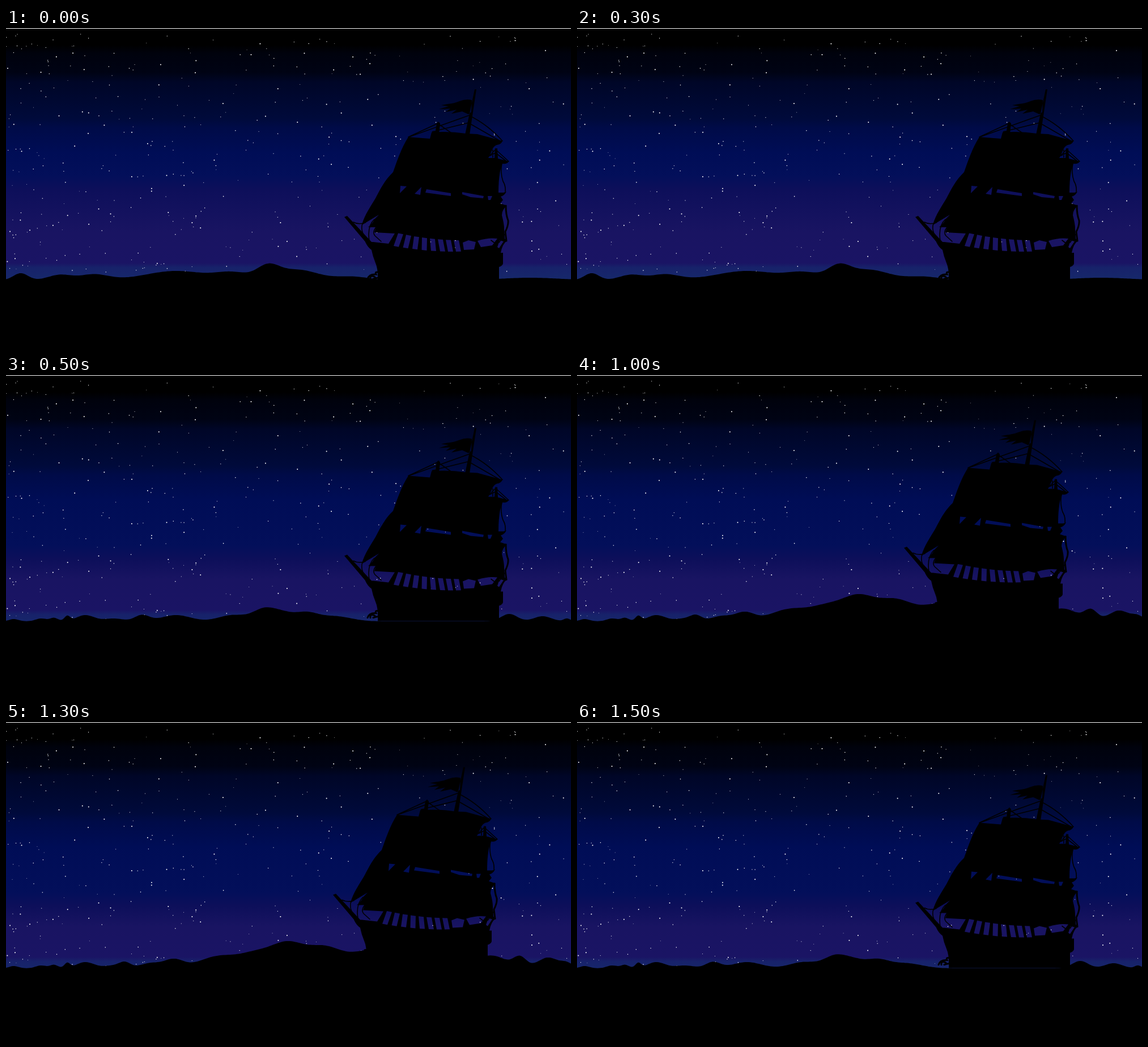
Animation, 997 px wide and 562 px high, one loop 2000 ms. Source, as an HTML page:

```html
<!DOCTYPE html>
<html lang="en">
<head>
<meta charset="utf-8">
<title>Night voyage</title>
<style>
html, body { margin: 0; width: 100%; height: 100%; overflow: hidden; background: #000; }
svg { display: block; width: 100vw; height: 100vh; }
.rope { fill: none; stroke: #000; stroke-width: 1.6; stroke-linecap: round; }
.thick { stroke-width: 3; }
</style>
</head>
<body>
<svg viewBox="0 0 997 562" preserveAspectRatio="none">
  <defs>
    <linearGradient id="sky" gradientUnits="userSpaceOnUse" x1="0" y1="0" x2="0" y2="562"></linearGradient>
  </defs>
  <rect width="997" height="562" fill="url(#sky)"/>
  <path id="stars" fill="#fff"/>
  <g id="ship">
    <!-- sails and hull -->
    <path id="body" fill-rule="evenodd" d="M628 347C632 330 645 312 652 300C660 285 668 268 683 254C690 235 697 212 710 192
      L748 195L751 184Q780 181 812 186L832 187L876 199Q874 205 866 206Q860 208 857 217L851 229H862L863 212H867L868 230
      L887 235Q885 240 876 239Q869 255 869 290H878L883 288Q880 295 873 297L877 303L872 309L884 313
      Q875 320 875 330Q879 345 879 353L880 371L884 375Q876 380 873 396H877V415Q876 419 870 421V448
      H656Q657 425 652 414Q647 402 645 391Q638 386 634 377H648L675 380L686 362L650 360L653 351H639Q646 346 651 336L658 329Z
      M696 278L707 279L695 291Z M721 292L733 280L731 294Z M742 284L785 291V296L740 290Z
      M805 289L843 296L842 300L820 298L805 293Z M850 296H858L855 303H851Z
      M806 378L816 374L829 377L826 390L808 391Z M832 375Q850 369 867 371L858 383L838 386Z M871 374L878 376L870 388L867 386Z"/>
    <!-- bowsprit, masts, flag -->
    <path d="M597 333L602 331L646 378L650 390L640 384L631 373Z
      M827 108H830L818 188H810Z M760 168L763 165L766 168L764 186L749 195L752 182L758 181Z
      M822 127Q812 124 800 129Q791 133 779 134L768 136L781 138L764 143L784 142L776 148L795 144L786 151L805 147L816 152L821 148Z"/>
    <path class="rope" d="M710 192L762 168M711 192L817 154M763 169L786 185M763 180L816 167
      M817 154Q850 170 876 199M816 167L870 198M851 227L864 214L887 235M854 225L864 220L882 234M859 215V228
      M875 238Q872 256 877 270Q882 278 881 288M613 342Q622 347 634 343M629 344Q625 357 634 369M650 337Q637 349 641 375
      M653 351Q646 360 651 366L662 376M856 374L865 381M881 362L870 378"/>
    <path class="rope thick" d="M882 313Q882 329 886 339Q887 347 881 359L883 375
      M660 431Q650 428 653 434Q641 433 638 442M643 442Q642 435 650 438Q654 441 648 442M662 439L651 441"/>
  </g>
  <path id="land"/>
  <rect width="997" height="1" fill="#fff"/>
</svg>
<script>
const BEAT = 500;
const WIDTH = 997;
const $ = id => document.getElementById(id);

// Each bump is [centre, height, half width].
const shore = [[14, 4, 12], [62, 5, 14], [85, 6, 10], [108, 9, 7], [140, 11, 22], [190, 5, 24]];
const swell = {
  dx: 0, dy: 0, dusk: 272, base: 444,
  bumps: [[26, 12, 18], [95, 9, 28], [155, 10, 36], [300, 16, 75], [400, 12, 40], [462, 22, 28],
    [515, 18, 50], [610, 6, 40], [925, 4, 70]]
};
const rise = {
  dx: 0, dy: -14.5, dusk: 312, base: 434,
  bumps: [...shore, [240, 11, 18], [300, 11, 36], [400, 11, 35], [455, 20, 28], [488, 13, 28], [530, 14, 28],
    [580, 9, 40], [888, 13, 20], [947, 9, 22], [990, 5, 8]]
};
const crest = {
  dx: -20, dy: -28.5, dusk: 312, base: 434,
  bumps: [...shore, [210, 9, 14], [255, 9, 26], [296, 15, 24], [375, 21, 48], [440, 22, 40], [497, 42, 42],
    [562, 34, 42], [640, 24, 50], [740, 26, 90], [860, 18, 35], [907, 18, 16], [957, 19, 26], [990, 8, 14]]
};
const poses = [swell, rise, crest, rise];

let seed = 4127;
function rand() {
  seed = (seed * 16807) % 2147483647;
  return seed / 2147483647;
}

function dot(x, y, r) {
  return `M${x - r} ${y}a${r} ${r} 0 1 0 ${2 * r} 0a${r} ${r} 0 1 0 ${-2 * r} 0`;
}

// Stars thin out to the right; one in five is large.
function plantStars() {
  let d = "";
  for (let i = 0; i < 440; i++) {
    const x = 990 * Math.pow(rand(), 1.25), y = 8 + 422 * rand();
    d += dot(x, y, rand() < 0.2 ? 1 : 0.45 + 0.35 * rand());
  }
  $("stars").setAttribute("d", d);
}

// Slanted openings between the foot of the lower sail and the rail
function cutGaps() {
  const foot = x => 374 - 13 * ((805 - x) / 115) ** 2;
  const rail = x => 394 - 14 * ((785 - x) / 110) ** 2;
  let d = $("body").getAttribute("d");
  for (let i = 0; i < 8; i++) {
    const l = 692 + 14 * i, r = l + 9, lean = Math.min(4, 2.5 * i - 8);
    d += `M${l} ${foot(l)}L${r} ${foot(r)}L${r + lean} ${rail(r)}L${l + lean} ${rail(l)}Z`;
  }
  $("body").setAttribute("d", d);
}

function ridge({ base, bumps }) {
  let d = "M0 562";
  for (let x = 0; x <= WIDTH; x += 3) {
    const y = bumps.reduce((s, [c, h, w]) => s - h * Math.exp(-(((x - c) / w) ** 2)), base);
    d += `L${x} ${y.toFixed(1)}`;
  }
  return d + `H${WIDTH}V562Z`;
}

function skyStops(dusk) {
  const stops = [[30, "#000"], [45, "#00020d"], [78, "#000314"], [95, "#000627"], [160, "#000a3b"],
    [176, "#000b48"], [220, "#000d56"], [dusk - 12, "#030f5a"], [dusk + 12, "#0d0f5a"],
    [360, "#191462"], [414, "#1a1464"], [422, "#17226a"], [446, "#16296b"]];
  return stops.map(([y, c]) => `<stop offset="${y / 562}" stop-color="${c}"/>`).join("");
}

let shown = -1;
function draw(t) {
  const k = Math.floor(t / BEAT) % poses.length;
  if (k === shown) return;
  shown = k;
  const pose = poses[k];
  $("sky").innerHTML = skyStops(pose.dusk);
  $("ship").setAttribute("transform", `translate(${pose.dx} ${pose.dy})`);
  $("land").setAttribute("d", ridge(pose));
}

plantStars();
cutGaps();
draw(0);
const start = performance.now();
function tick() {
  draw(performance.now() - start);
  requestAnimationFrame(tick);
}
requestAnimationFrame(tick);
</script>
</body>
</html>
```
